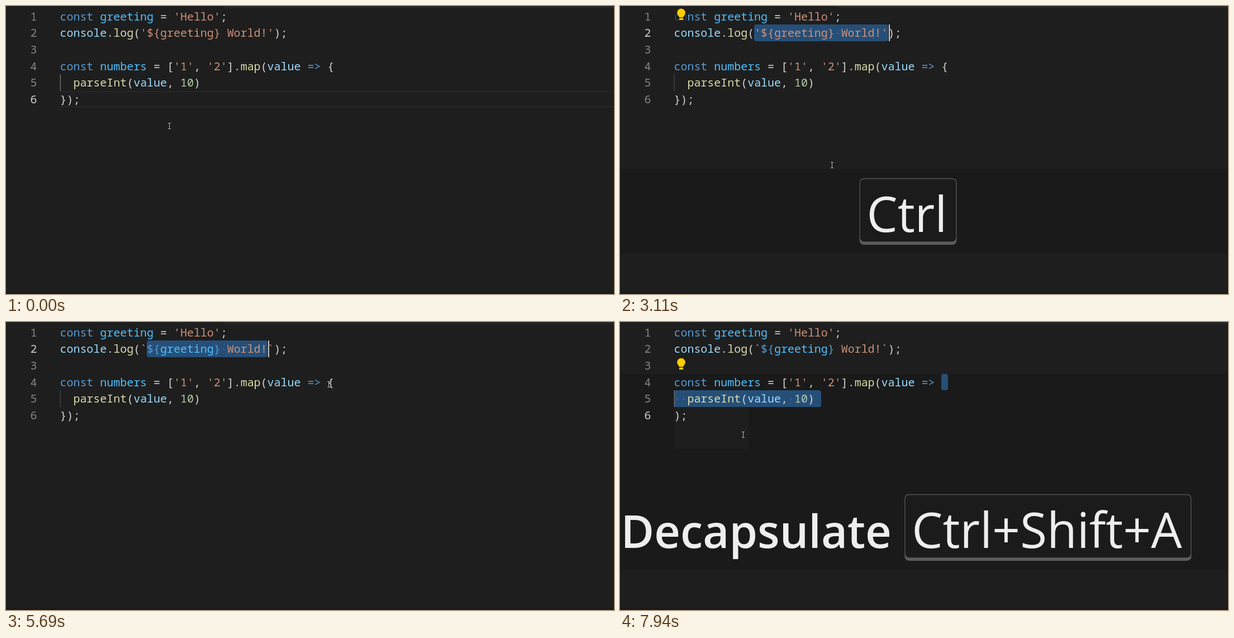
Recreate the animation shown at these times as an HTML page with a canvas. Size 1088 by 515 pixels, loop 8 s.

```html
<!DOCTYPE html>
<html lang="en">
<head>
<meta charset="utf-8">
<title>Decapsulate demo</title>
<style>
  html, body { margin: 0; width: 100%; height: 100%; overflow: hidden; background: #1e1e1e; }
  canvas { display: block; }
</style>
</head>
<body>
<canvas id="stage" width="1088" height="515"></canvas>
<script>
const ctx = document.getElementById('stage').getContext('2d');
const LOOP = 8000, LEFT = 96.5, CHAR = 11.97, TOP = 3.4, ROW = 29.7;
const MONO = '500 19.95px "Noto Sans Mono", monospace';
const C = {
  bg: '#1e1e1e', shade: '#1a1a1a', key: '#569cd6', name: '#4fc1ff', str: '#ce9178', fn: '#dcdcaa',
  id: '#9cdcfe', num: '#b5cea8', text: '#d4d4d4', select: '#264f78', caret: '#c4c5c3'
};

// Moments of the story, in ms
const CLICK1 = 1440, UP1 = 2600, CUT1 = 3270, TICK = 4720, CLICK2 = 5850, UP2 = 6900, CUT2 = 7400;

// The picture only moves on at these steps: [first, last, count]
const steps = [0, ...[
  [280, 1300, 9], [1440, 2200, 6], [2350, 2350, 1], [2600, 3540, 8], [3660, 4200, 5],
  [4450, 4600, 2], [4720, 5690, 8], [5850, 6360, 5], [6510, 6750, 3], [6900, 7940, 7]
].flatMap(([a, b, n]) => Array.from({ length: n }, (_, i) => n > 1 ? a + (b - a) * i / (n - 1) : a))];

// Pointer path: [time, x, y]
const path = [
  [0, 292, 214], [150, 292, 214], [1300, 247, 48], [1440, 247, 47], [2200, 474, 47],
  [2350, 482, 47], [2480, 482, 47], [3270, 343, 370], [3540, 343, 370], [4060, 335, 345],
  [4860, 335, 345], [5560, 577, 111], [5850, 577, 111], [6230, 165, 188], [6360, 132, 174],
  [6510, 126, 174], [6750, 110, 172], [6900, 110, 172], [7420, 220.5, 201], [8000, 220.5, 201]
];

const snap = t => steps.filter(s => s <= t + 0.01).pop();
const colX = col => Math.round(LEFT + col * CHAR);
const rowY = row => Math.round(TOP + (row - 1) * ROW);
const rowH = row => rowY(row + 1) - rowY(row);
const plain = parts => parts.map(part => part[1]).join('');

function pointerAt(t) {
  const i = Math.max(1, path.findIndex(p => p[0] >= t));
  const [a, b] = [path[i - 1], path[i]];
  const k = (t - a[0]) / (b[0] - a[0]);
  const e = k * k * (3 - 2 * k);
  return { x: a[1] + (b[1] - a[1]) * e, y: a[2] + (b[2] - a[2]) * e };
}

function codeLines(t) {
  let arg;
  if (t < CUT1) arg = [['str', "'${greeting} World!'"]];
  else if (t < TICK) arg = [['id', '$'], ['text', '{'], ['id', 'greeting'], ['text', '} '], ['id', 'World'], ['text', '!']];
  else arg = [['str', '`'], ['key', '${'], ['name', 'greeting'], ['key', '}'], ['str', ' World!`']];
  const cut = t >= CUT2;
  return [
    [['key', 'const '], ['name', 'greeting'], ['text', ' = '], ['str', "'Hello'"], ['text', ';']],
    [['id', 'console'], ['text', '.'], ['fn', 'log'], ['text', '('], ...arg, ['text', ');']],
    [],
    [['key', 'const '], ['name', 'numbers'], ['text', ' = ['], ['str', "'1'"], ['text', ', '], ['str', "'2'"],
     ['text', '].'], ['fn', 'map'], ['text', '('], ['id', 'value '], ['key', '=>'], ['text', cut ? ' ' : ' {']],
    [['text', '  '], ['fn', 'parseInt'], ['text', '('], ['id', 'value'], ['text', ', '], ['num', '10'], ['text', ')']],
    [['text', cut ? ');' : '});']]
  ];
}

// Text position under the pointer, as [row, column]
function locate(p, lines) {
  const row = Math.floor((p.y - TOP) / ROW) + 1;
  if (row > 6) return [6, plain(lines[5]).length];
  const col = Math.round((p.x - LEFT) / CHAR);
  return [row, Math.max(0, Math.min(plain(lines[row - 1]).length, col))];
}

// Returns [anchor, caret], each as [row, column]
function selectionAt(t, lines) {
  const drag = (anchor, end) => [anchor, locate(pointerAt(Math.min(t, end)), lines)];
  if (t < CLICK1) return [[6, 3], [6, 3]];
  if (t < CUT1) return drag([2, 12], 2350);
  if (t < TICK) return [[2, 12], [2, 30]];
  if (t < CLICK2) return [[2, 13], [2, 31]];
  if (t < CUT2) return drag([4, 40], 6750);
  return [[4, 40], [6, 0]];
}

function caretShown(t) {
  if (t < CLICK1) return false;
  const blink = start => Math.floor((t - start) / 500) % 2 === 0;
  if (t >= CUT2) return blink(CUT2);
  if (t >= CLICK2) return true;
  if (t >= TICK) return blink(4660);
  return t < CUT1 || blink(CUT1);
}

function overlayAt(t) {
  if (t >= CUT1 && t < CUT1 + 800 || t >= CUT2) return { title: 'Decapsulate', keys: 'Ctrl+Shift+A' };
  if (t >= TICK && t < TICK + 800) return { keys: '`' };
  for (const cut of [CUT1, CUT2]) {
    if (t >= cut - 160 && t < cut) return { keys: 'Ctrl+Shift' };
    if (t >= cut - 330 && t < cut) return { keys: 'Ctrl' };
  }
}

function rect(x, y, w, h, color) {
  ctx.fillStyle = color;
  ctx.fillRect(x, y, w, h);
}

function roundRect(x, y, w, h, r, color) {
  ctx.fillStyle = color;
  ctx.beginPath();
  ctx.roundRect(x, y, w, h, r);
  ctx.fill();
}

function write(text, x, y, font, color) {
  ctx.font = font;
  ctx.fillStyle = color;
  ctx.fillText(text, x, y);
}

function drawSelection([from, to], lines) {
  if (to[0] < from[0] || to[0] === from[0] && to[1] < from[1]) [from, to] = [to, from];
  for (let row = from[0]; row <= to[0]; row++) {
    const text = plain(lines[row - 1]);
    const a = row === from[0] ? from[1] : 0;
    const b = row === to[0] ? to[1] : text.length + 1;
    if (b <= a) continue;
    roundRect(colX(a), rowY(row), colX(b) - colX(a), rowH(row), 4, C.select);
    for (let col = a; col < b; col++) {
      if (text[col] === ' ') rect(colX(col) + 5, rowY(row) + 15, 2, 2, '#55728f');
    }
  }
}

function drawSquiggle(a, b) {
  ctx.beginPath();
  for (let x = colX(a), i = 0; x <= colX(b); x += 4, i++) ctx.lineTo(x, i % 2 ? 58 : 61.5);
  ctx.strokeStyle = '#f14c4c';
  ctx.lineWidth = 1.5;
  ctx.stroke();
}

function drawBulb(row) {
  const y = rowY(row);
  ctx.globalAlpha = 0.7;
  rect(97, y, 24, 25, C.bg);
  ctx.globalAlpha = 1;
  ctx.fillStyle = '#ffcc00';
  ctx.beginPath();
  ctx.arc(109.5, y + 9, 7.3, Math.PI * 0.8, Math.PI * 2.2);
  ctx.lineTo(112.8, y + 17.3);
  ctx.lineTo(106.2, y + 17.3);
  ctx.fill();
  rect(106, y + 18.5, 7, 3.5, '#ffcc00');
}

function drawOverlay({ title, keys }) {
  const font = '87.4px "Open Sans", sans-serif';
  ctx.font = font;
  const w = ctx.measureText(keys).width + 30;
  const x = title ? 509.3 : 515.5 - w / 2;
  if (title) write(title, 1.5, 404, '600 81.3px "Open Sans", sans-serif', '#eeeeee');
  roundRect(x, 308, w, 119, 8, '#5c5c5c');
  roundRect(x + 1.2, 309.2, w - 2.4, 112, 7, '#1b1b1b');
  write(keys, x + 13, 404, font, '#eeeeee');
}

function drawPointer({ x, y }, pressed) {
  ctx.strokeStyle = '#b8b8b8';
  ctx.lineWidth = 1;
  ctx.beginPath();
  const px = Math.floor(x) + 0.5, py = Math.floor(y) + 0.5;
  ctx.moveTo(px, py - 5);
  ctx.lineTo(px, py + 5);
  for (const dy of [-5, 5]) {
    ctx.moveTo(px - 2.5, py + dy);
    ctx.lineTo(px + 2.5, py + dy);
  }
  ctx.stroke();
  if (!pressed) return;
  ctx.strokeStyle = '#f00000';
  ctx.lineWidth = 2.3;
  ctx.beginPath();
  ctx.arc(x + 0.5, y + 3, 17.8, 0, Math.PI * 2);
  ctx.stroke();
}

function draw(time) {
  const t = snap(time);
  const lines = codeLines(t);
  const sel = selectionAt(t, lines);
  const [anchor, caret] = sel;
  const overlay = overlayAt(t);

  rect(0, 0, 1088, 515, C.bg);
  rect(390, 0, 698, 4, '#252526');
  rect(0, 511, 1088, 4, C.shade);
  if (t >= CUT1 && t < TICK) rect(0, 33, 1088, 259, C.shade);
  if (t >= CUT2) {
    rect(0, 93, 1088, 199, C.shade);
    rect(97, 152, 133, 75, C.bg);
  }
  if (overlay) rect(0, 292, 1088, 151, C.shade);

  if (String(anchor) === String(caret)) {
    for (const dy of [0, 27]) rect(97, rowY(caret[0]) + dy, 991, 2, '#282828');
  }
  drawSelection(sel, lines);

  const dim = t >= CLICK1 && t < CUT1 || t >= TICK && t < CLICK2;
  rect(96.5, rowY(5), 1.6, rowH(5), dim ? '#404040' : '#686868');

  lines.forEach((parts, i) => {
    const y = Math.round(TOP + i * ROW + 22.2);
    write(String(i + 1), 43.5, y, MONO, caret[0] === i + 1 ? '#d0d0d0' : '#858585');
    let col = 0;
    for (const [kind, text] of parts) {
      write(text, LEFT + col * CHAR, y, MONO, C[kind]);
      col += text.length;
    }
  });

  if (t >= 3900 && t < TICK) {
    drawSquiggle(13, 14);
    drawSquiggle(24, 30);
  }
  if (caretShown(t)) rect(colX(caret[1]) + 1, rowY(caret[0]), 2, rowH(caret[0]), C.caret);
  if (t >= 1740 && t < 4000) drawBulb(1);
  if (t >= 7070) drawBulb(3);
  if (overlay) drawOverlay(overlay);
  drawPointer(pointerAt(t), t >= CLICK1 && t < UP1 || t >= CLICK2 && t < UP2);
}

const start = performance.now();
function tick() {
  draw((performance.now() - start) % LOOP);
  requestAnimationFrame(tick);
}
tick();
</script>
</body>
</html>
```
